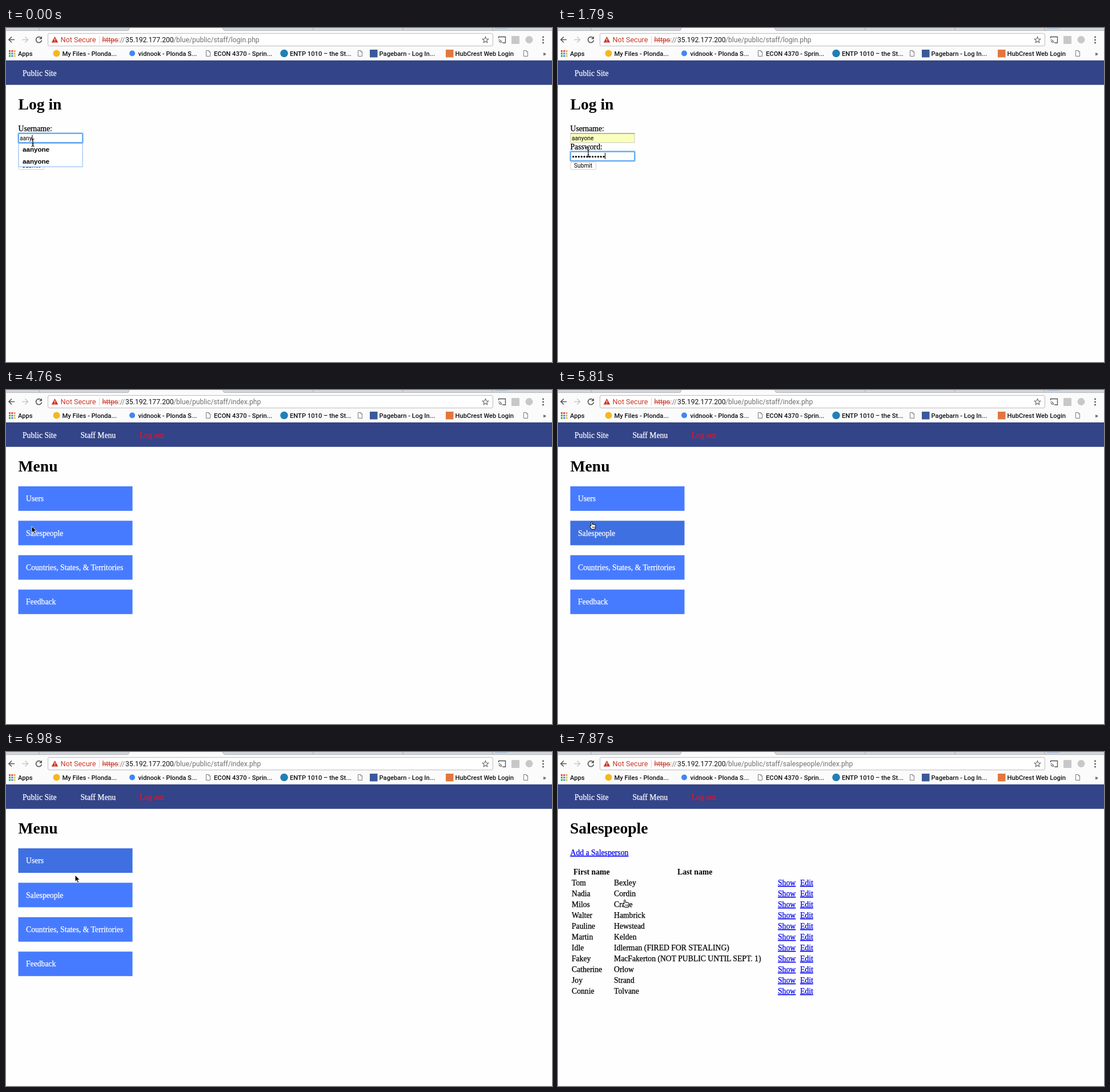
Write an HTML page that moves like this. It is 956x586 px and loops after 8 s.

```html
<!DOCTYPE html>
<html lang="en">
<head>
<meta charset="utf-8">
<title>Staff login</title>
<style>
html, body { margin: 0; width: 100%; height: 100%; overflow: hidden; background: #fefefe; }
svg { display: block; width: 956px; height: 586px; }
text { white-space: pre; }
.ui { font-family: Roboto, Arial, sans-serif; }
.url { font-size: 12.15px; }
.mark { font-size: 11.2px; font-weight: 500; fill: #111; }
.field { font-size: 10.2px; fill: #000; }
.pick { font: bold 11.6px "Liberation Sans", Arial, sans-serif; }
.page { font: 13.7px "Liberation Serif", "Times New Roman", serif; stroke: #000; stroke-width: .25px; }
.page.nav { fill: #fff; stroke: #fff; }
.page.exit { fill: #ff0a1c; stroke: #ff0a1c; }
.page.bold { font-weight: bold; stroke: none; }
.page.head { font-weight: bold; font-size: 27.6px; stroke: none; }
.page.link { fill: #00e; stroke: #00e; text-decoration: underline; }
</style>
</head>
<body>
<svg id="stage" viewBox="0 0 956 586"></svg>
<script>
const LOOP = 8000;
const USER = 'aanyone';
const BLUE = '#477bff', MID = '#3f70e2', DARK = '#335fc8';

// Each step changes only the listed properties.
const STEPS = [
  [0, { page: 'login', url: 'login.php', load: 0, user: 'aany', fill: 0, focus: 'user', caret: 46,
        drop: 1, pick: 0, dots: 0, press: 0, users: BLUE, sales: BLUE, cur: ['beam', 47, 201] }],
  [150, { cur: ['beam', 47, 203] }],
  [300, { cur: ['arrow', 49, 207], pick: 1 }],
  [450, { cur: ['arrow', 50, 211], user: USER, fill: 1, caret: 0 }],
  [600, { drop: 0, pick: 0, caret: 63, cur: ['arrow', 51, 213] }],
  [740, { cur: ['beam', 52, 218] }],
  [890, { cur: ['beam', 53, 220] }],
  [1040, { focus: 'pass', caret: 24.5 }],
  [1490, { caret: 0 }],
  [1790, { dots: 12, caret: 82.5 }],
  [2080, { cur: ['beam', 52, 225] }],
  [2230, { cur: ['beam', 49, 231], caret: 0 }],
  [2380, { cur: ['arrow', 45, 239] }],
  [2520, { press: 1, focus: '' }],
  [2670, { press: 0, load: 1 }],
  [3860, { url: 'index.php' }],
  [4610, { page: 'menu' }],
  [4760, { load: 0 }],
  [5810, { cur: ['hand', 55, 231], sales: MID }],
  [5960, { cur: ['hand', 84, 187], sales: BLUE, users: MID }],
  [6100, { cur: ['arrow', 118, 118], users: BLUE }],
  [6250, { cur: ['arrow', 126, 146] }],
  [6390, { cur: ['hand', 126, 182], users: MID }],
  [6540, { users: DARK }],
  [6830, { cur: ['hand', 124, 197] }],
  [6980, { cur: ['arrow', 121, 216], users: MID }],
  [7130, { cur: ['hand', 116, 246], users: BLUE, sales: MID }],
  [7280, { cur: ['hand', 113, 259], sales: DARK }],
  [7570, { load: 1 }],
  [7720, { url: 'salespeople/index.php' }],
  [7870, { page: 'list', load: 0 }],
];

const PEOPLE = [
  ['Tom', 'Bexley'], ['Nadia', 'Cordin'], ['Milos', 'Crane'], ['Walter', 'Hambrick'],
  ['Pauline', 'Hewstead'], ['Martin', 'Kelden'], ['Idle', 'Idlerman (FIRED FOR STEALING)'],
  ['Fakey', 'MacFakerton (NOT PUBLIC UNTIL SEPT. 1)'], ['Catherine', 'Orlow'],
  ['Joy', 'Strand'], ['Connie', 'Tolvane'],
];

const text = (x, y, s, cls, more = '') => `<text x="${x}" y="${y}" class="${cls}" ${more}>${s}</text>`;
const rect = (x, y, w, h, fill, more = '') =>
  `<rect x="${x}" y="${y}" width="${w}" height="${h}" fill="${fill}" ${more}/>`;
const dot = (x, y, r, fill) => `<circle cx="${x}" cy="${y}" r="${r}" fill="${fill}"/>`;
const line = (d, color, w = 1) => `<path d="${d}" fill="none" stroke="${color}" stroke-width="${w}"/>`;
const each = (n, f) => Array.from({ length: n }, (_, i) => f(i)).join('');

const sheet = x => `<path d="M${x} 39.5h4.5l2.5 2.5v7.5h-7z" fill="#fff" stroke="#777"/>`
  + line(`M${x + 4.5} 39.5v2.5h2.5`, '#777', .8);

function star(cx, cy) {
  const pts = each(10, i => {
    const a = i * Math.PI / 5 - Math.PI / 2, r = i % 2 ? 2.5 : 5.6;
    return `${(cx + r * Math.cos(a)).toFixed(1)},${(cy + r * Math.sin(a)).toFixed(1)} `;
  });
  return `<polygon points="${pts}" fill="none" stroke="#666" stroke-width="1.1"/>`;
}

const tabs = rect(0, 0, 956, 5, '#d3d6da')
  + '<path d="M214 5l2-5h163l3 5z" fill="#fafafa"/>'
  + line('M0 4.5H214l2-4.5M379 0l3 4.5H956', '#b3b5b8')
  + [57, 537, 694, 851].map(x => line(`M${x} 0l2 4.5`, '#a9abae')).join('')
  + rect(856, 0, 22, 2, '#b7c7dc');

const toolbar = line('M15 20.5H5M10 15.5l-5 5 5 5', '#555', 1.6)
  + line('M28 20.5H38M33.5 15.5l5 5-5 5', '#c8c8c8', 1.6)
  + rect(73.5, 9.5, 779, 22, '#fff', 'rx="2.5" stroke="#bcbcbc"')
  + '<path d="M85.5 15l5.8 10.5H79.700z" fill="#cc3526"/>'
  + line('M85.5 18.5v3.5M85.5 23v1.3', '#fff', 1.2)
  + text(95.5, 25, 'Not Secure', 'ui', 'font-size="12.6" fill="#c53929"')
  + line('M163.5 14v14', '#d5d5d5')
  + text(168.5, 25, 'https', 'ui url', 'fill="#c53929"')
  + line('M168.5 21.5h28.5', '#c53929', 1.1)
  + text(196.5, 25, '://', 'ui url', 'fill="#777"')
  + text(209, 25, '35.192.177.200', 'ui url', 'fill="#111"')
  + star(839.5, 21)
  + line('M862.5 18v-2.5h12v10.5h-5', '#555', 1.3)
  + line('M862.5 20.5a5.5 5.5 0 0 1 5.5 5.5M862.5 23a3 3 0 0 1 3 3', '#555', 1.2)
  + rect(885, 14, 14, 14, '#c8c8c8', 'rx="1"')
  + dot(916, 20.5, 6.5, '#c8c8c8')
  + [16, 21, 26].map(y => dot(940.5, y, 1.4, '#555')).join('');

const APP_COLORS = ['#e04a3f', '#e04a3f', '#e8a33d', '#3aa757', '#4285f4', '#e8b93d', '#3aa757', '#4285f4', '#e8b93d'];
const bookmarks = APP_COLORS.map((c, i) => rect(5 + i % 3 * 4.3, 39 + (i / 3 | 0) * 4.3, 3, 3, c)).join('')
  + dot(88.5, 44.5, 6, '#f4b81f') + dot(221, 44.5, 5, '#4285f4')
  + sheet(350.5) + dot(487, 44.5, 6.8, '#2080b5') + sheet(616.5)
  + rect(637, 38, 13.5, 13.5, '#3b5998') + rect(770, 38, 13.5, 13.5, '#e2763f') + sheet(906.5)
  + [[21, 'Apps'], [98.5, 'My Files - Plonda...'], [231.5, 'vidnook - Plonda S...'],
     [364, 'ECON 4370 - Sprin...'], [497, 'ENTP 1010 – the St...'], [653.5, 'Pagebarn - Log In...'],
     [786.5, 'HubCrest Web Login'], [940, '»']].map(([x, s]) => text(x, 48.5, s, 'ui mark')).join('');

const frame = rect(0, 0, 956, 57, '#fbfbfb') + tabs + toolbar + bookmarks
  + line('M0 56.5H956', '#d9dbe2') + rect(0, 57, 956, 42.75, '#334488')
  + text(29, 84, 'Public Site', 'page nav');

const staffNav = text(130.5, 84, 'Staff Menu', 'page nav') + text(234, 84, 'Log out', 'page exit');

const reload = line('M61.3 17.3a5 5 0 1 0 1.2 4.2', '#555', 1.6) + '<path d="M63 14.5v5h-5z" fill="#555"/>';
const stop = line('M53 16l9.5 9.5M62.5 16l-9.5 9.5', '#555', 1.7);

function input(y, focused, filled) {
  const bg = filled ? '#faffbd' : '#fff';
  if (focused) return rect(20.5, y - 1.5, 115, 19, 'none', 'rx="2" stroke="#c4def9" stroke-width="1.5"')
    + rect(22, y, 112, 16, bg, 'rx="1" stroke="#66aaf0" stroke-width="2"');
  return rect(22, y, 112, 16, bg, `stroke="${filled ? '#c9c9b4' : '#d6d6d6'}"`)
    + (filled ? line(`M21.5 ${y}h113`, '#888') : '');
}

function login(s) {
  const row = s.focus === 'user' ? 187.5 : 219;
  let out = text(21.5, 143, 'Log in', 'page head')
    + text(21.5, 181, 'Username:', 'page') + text(21.5, 213, 'Password:', 'page')
    + input(217, s.focus === 'pass', 0) + input(185, s.focus === 'user', s.fill)
    + text(24, 197, s.user, 'ui field')
    + each(s.dots, i => dot(26.7 + i * 4.85, 225.8, 1.65, '#000'))
    + rect(22, 235.5, 44.5, 13, s.press ? '#5a9cf0' : '#fff', 'rx="2.5" stroke="#d2d2d2"')
    + text(28, 245.3, 'Submit', 'ui field');
  if (s.caret) out += rect(s.caret - .5, row, 1, 11, '#000');
  if (s.drop) out += rect(22, 202.5, 112, 41, '#fff', 'stroke="#86b6ee"')
    + (s.pick ? rect(22.5, 203, 111, 20, '#e6e6e6') : '')
    + text(29, 217, USER, 'pick') + text(29, 238, USER, 'pick');
  return out;
}

function menu(s) {
  const items = [['Users', s.users], ['Salespeople', s.sales], ['Countries, States, &amp; Territories', BLUE], ['Feedback', BLUE]];
  return staffNav + text(21.5, 143, 'Menu', 'page head')
    + items.map(([name, fill], i) => {
      const y = 169 + i * 60.4;
      return rect(21.5, y, 200, 43, fill) + text(35, y + 26.2, name, 'page nav');
    }).join('');
}

function list() {
  return staffNav + text(21, 143, 'Salespeople', 'page head')
    + text(21.5, 181, 'Add a Salesperson', 'page link')
    + text(27, 215, 'First name', 'page bold') + text(209, 215, 'Last name', 'page bold')
    + PEOPLE.map(([first, last], i) => {
      const y = 234 + i * 19;
      return text(24, y, first, 'page') + text(98, y, last, 'page')
        + text(385, y, 'Show', 'page link') + text(424, y, 'Edit', 'page link');
    }).join('');
}

const CURSORS = {
  beam: line('M-2.5-6.5q2.5 0 2.5 2v9q0 2-2.5 2M2.5-6.5q-2.5 0-2.5 2M2.5 6.5q-2.5 0-2.5-2M-1.5 2.5h3', '#111', 1.2),
  arrow: '<path d="M0 0V11.5L2.7 9 4.6 13.4 6.6 12.5 4.7 8.3H8.2Z" fill="#000" stroke="#fff" stroke-width=".9"/>',
  hand: '<path d="M2.8 8V1.5a1.1 1.1 0 0 1 2.2 0V5.2a1 1 0 0 1 2 .2 1 1 0 0 1 2 .4 .9.9 0 0 1 1.8.4V9.5l-1.2 4H4.2L.6 8.6a1 1 0 0 1 1.5-1.2z" fill="#fff" stroke="#000"/>'
    + line('M5.5 8.5v3M7.3 8.5v3M9 8.5v3', '#000', .7),
};

const pages = { login, menu, list };

function draw(s) {
  const [kind, x, y] = s.cur;
  return rect(0, 0, 956, 586, '#fefefe') + frame + (s.load ? stop : reload)
    + text(293, 25, '/blue/public/staff/' + s.url, 'ui url', 'fill="#707070"')
    + pages[s.page](s)
    + `<g transform="translate(${x} ${y})">${CURSORS[kind]}</g>`;
}

let state = {};
const views = STEPS.map(([at, change]) => {
  state = { ...state, ...change };
  return { at, svg: draw(state) };
});

const stage = document.getElementById('stage');
const start = performance.now();
let shown = -1;

function tick() {
  const t = (performance.now() - start) % LOOP;
  let i = views.length - 1;
  while (i > 0 && views[i].at > t) i--;
  if (i !== shown) stage.innerHTML = views[shown = i].svg;
  requestAnimationFrame(tick);
}
tick();
</script>
</body>
</html>
```
